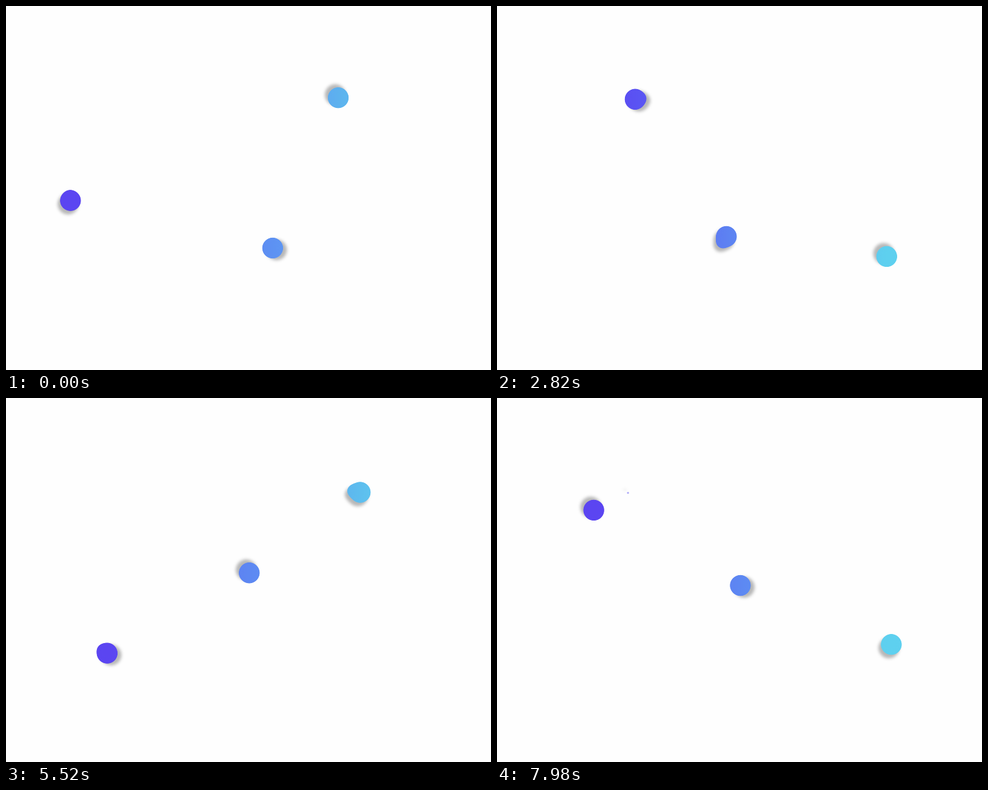
An HTML page that plays this animation: 800 by 600 pixels, repeating every 8000 ms.

```html
<!DOCTYPE html>
<html lang="en">
<head>
<meta charset="utf-8">
<title>Gooey infinity</title>
<style>
  html, body { margin: 0; width: 100%; height: 100%; overflow: hidden; background: #fefefe; }
  svg { display: block; width: 100%; height: 100%; }
</style>
</head>
<body>
<svg id="stage" viewBox="0 0 800 600">
  <defs>
    <linearGradient id="hue" gradientUnits="userSpaceOnUse" x1="100" y1="0" x2="700" y2="0">
      <stop offset=".12" stop-color="#5b45f1"/>
      <stop offset=".24" stop-color="#5a56f3"/>
      <stop offset=".48" stop-color="#5d84f2"/>
      <stop offset=".68" stop-color="#5ea3f3"/>
      <stop offset=".75" stop-color="#5db2ee"/>
      <stop offset=".9" stop-color="#5ed0ef"/>
    </linearGradient>
  </defs>
</svg>
<script>
const LOOP = 8000, TICK = 30;                 // ms
const SPEED = 0.05;                           // degrees per ms; the whole eight is 720 degrees
const FIRST_BALL = 89.3, BALL_GAP = 229;      // degrees along the eight
const SHADOW_ANGLES = [225, 25, 125], SHADOW_DISTANCE = 7;
const BALL_RADIUS = 17.7, DROP_RADIUS = 12.7;
const DROP_SPACING = 45, DROP_LIFE = 40;      // degrees travelled by the ball
const stage = document.getElementById('stage');
const radians = degrees => degrees * Math.PI / 180;

// Two touching circles: up and around the right one, then the left one.
function pathPoint(degrees) {
  const phase = degrees % 720;
  const angle = radians(phase + 0.9 * Math.sin(radians(phase - 60)));
  const [cx, cy, r, side] = phase < 360 ? [548.7, 299, 147.8, -1] : [253.3, 300, 148.4, 1];
  return [cx + side * r * Math.cos(angle), cy - r * Math.sin(angle)];
}

function gooFilter(id, shadowAngle) {
  const dx = SHADOW_DISTANCE * Math.cos(radians(shadowAngle));
  const dy = SHADOW_DISTANCE * Math.sin(radians(shadowAngle));
  return `
    <filter id="${id}" filterUnits="userSpaceOnUse" x="0" y="0" width="800" height="600"
        color-interpolation-filters="sRGB">
      <feGaussianBlur stdDeviation="4.5"/>
      <feColorMatrix values="1 0 0 0 0  0 1 0 0 0  0 0 1 0 0  0 0 0 14 -6.5"/>
      <feDropShadow dx="${dx}" dy="${dy}" stdDeviation="2.5" flood-color="#000" flood-opacity=".28"/>
    </filter>`;
}

stage.insertAdjacentHTML('beforeend', SHADOW_ANGLES.map((angle, i) => `
  ${gooFilter('goo' + i, angle)}
  <g class="ball" fill="url(#hue)" filter="url(#goo${i})"></g>`).join(''));
const groups = stage.querySelectorAll('.ball');

const circle = ([x, y], r) =>
  `<circle cx="${x.toFixed(2)}" cy="${y.toFixed(2)}" r="${r.toFixed(2)}"/>`;

// A drop leaves its ball slowly, falls behind ever faster and shrinks away.
function drop(phase) {
  const age = (phase + 2) % DROP_SPACING;
  if (age > DROP_LIFE + 1) return '';
  const ease = (age / DROP_LIFE) ** 2.3;
  return circle(pathPoint(phase - 1.5 - 22.5 * ease), DROP_RADIUS - 7.4 * ease);
}

function draw(time) {
  groups.forEach((group, i) => {
    const phase = FIRST_BALL + BALL_GAP * i + SPEED * time;
    group.innerHTML = circle(pathPoint(phase), BALL_RADIUS) + drop(phase);
  });
}

const origin = performance.now();
function frame() {
  const elapsed = (performance.now() - origin) % LOOP;
  draw(Math.floor(elapsed / TICK) * TICK);
  requestAnimationFrame(frame);
}
frame();
</script>
</body>
</html>
```
